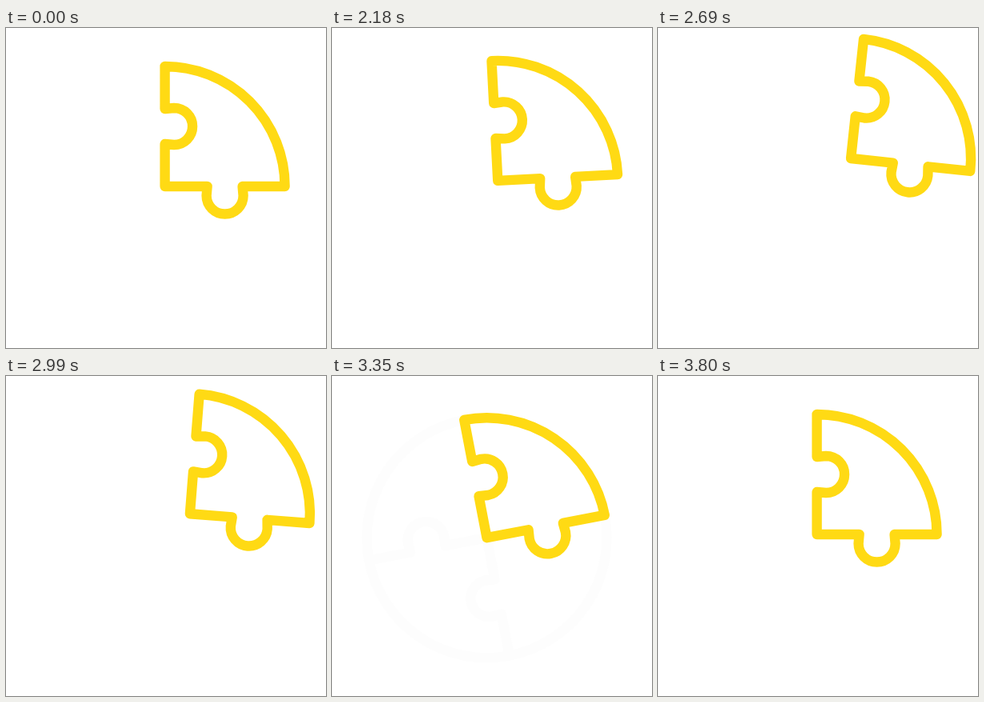
These frames come from a looping animation (400x400 px, 3.83 s). An HTML page with a canvas:

```html
<!DOCTYPE html>
<html lang="en">
<head>
<meta charset="utf-8">
<title>Puzzle piece</title>
<style>
  html, body { margin: 0; width: 100%; height: 100%; overflow: hidden; background: #fff; }
  canvas { display: block; width: 100vmin; height: 100vmin; }
</style>
</head>
<body>
<canvas id="stage" width="400" height="400"></canvas>
<script>
const ctx = document.getElementById('stage').getContext('2d');
const LOOP = 3830, HOLD = 2030, STEP = 30;
const R = 150, KNOB = 23, RAD = Math.PI / 180;

const smooth = s => s * s * (3 - 2 * s);
const fastStart = s => smooth(1 - (1 - s) ** 2.7);
const slowStart = s => smooth(s ** 1.85);
const easeOut = s => 1 - (1 - s) ** 2;

// 0 before a, 1 after b, eased between
const ramp = (t, a, b, ease = smooth) =>
  ease(Math.min(1, Math.max(0, (t - a) / (b - a))));

// How far the piece is pulled out: dip, pull, return, settle
const pullAt = t => {
  const dip = 0.12;
  return -dip * ramp(t, 2000, 2080, easeOut)
    + (1 + dip) * ramp(t, 2090, 2690, fastStart)
    - (1 + dip) * ramp(t, 2690, 3250, slowStart)
    + dip * ramp(t, 3560, 3800);
};

// Extra turn in degrees: one swing before the pull, one after the return
const turnAt = t =>
  -7.4 * (ramp(t, 2000, 2105) - ramp(t, 2105, 2270))
  - 12 * (ramp(t, 3140, 3420) - ramp(t, 3430, 3770));

function stroke(color) {
  ctx.strokeStyle = color;
  ctx.stroke();
}

// An edge from the centre to the rim along +x, with a knob bulging to +y
function edge() {
  const mid = R / 2, half = KNOB - 1;
  ctx.lineTo(0, 0);
  ctx.lineTo(mid - half, 0);
  ctx.arc(mid, KNOB / 2, KNOB, Math.PI, 0, true);
  ctx.lineTo(mid + half, 0);
  ctx.lineTo(R, 0);
}

function drawPiece() {
  const mid = R / 2, half = KNOB - 1;
  ctx.beginPath();
  edge();
  ctx.arc(0, 0, R, 0, -Math.PI / 2, true);
  ctx.lineTo(0, -mid - half);
  ctx.arc(KNOB / 2, -mid, KNOB, -Math.PI / 2, Math.PI / 2);
  ctx.lineTo(0, -mid + half);
  ctx.closePath();
  stroke('#ffda14');
}

// The other three pieces, barely off-white
function drawRest() {
  ctx.beginPath();
  ctx.arc(0, 0, R, 0, Math.PI * 1.5);
  for (let i = 0; i < 2; i++) {
    ctx.rotate(Math.PI / 2);
    ctx.moveTo(0, 0);
    edge();
  }
  ctx.rotate(-Math.PI);
  stroke('#fdfdfd');
}

function draw(t) {
  const time = t < HOLD ? 0 : HOLD + Math.floor((t - HOLD) / STEP) * STEP;
  const pull = pullAt(time);
  ctx.setTransform(1, 0, 0, 1, 0, 0);
  ctx.fillStyle = '#fff';
  ctx.fillRect(0, 0, 400, 400);
  ctx.lineCap = ctx.lineJoin = 'round';
  ctx.lineWidth = 12.4;
  ctx.translate(198.6 + 42.5 * pull, 198 - 35 * pull);
  ctx.rotate((6.1 * pull + turnAt(time)) * RAD);
  if (time >= 3110 && time < 3800) drawRest();
  drawPiece();
}

const start = performance.now();
function tick() {
  draw((performance.now() - start) % LOOP);
  requestAnimationFrame(tick);
}
tick();
</script>
</body>
</html>
```
